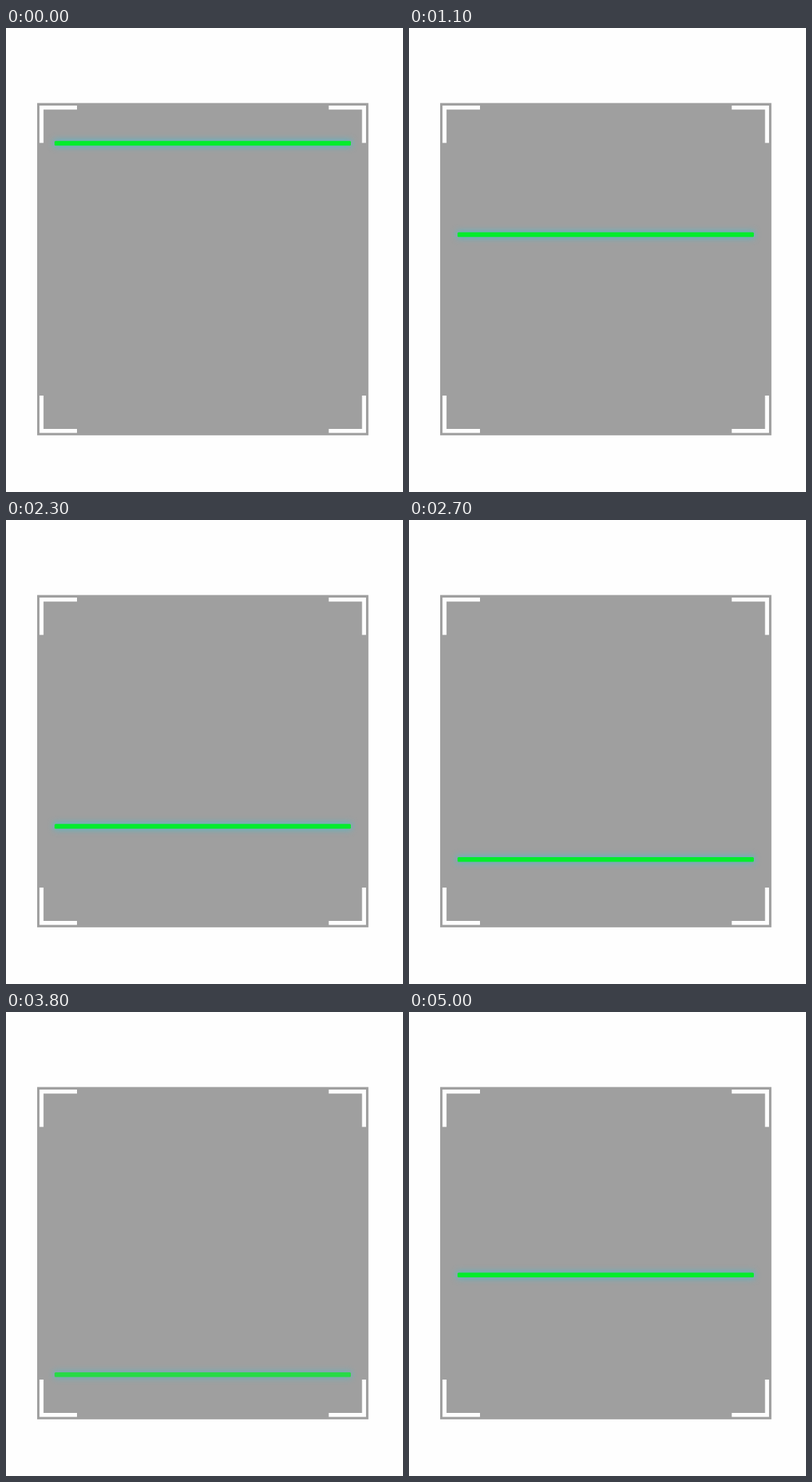
Animation of 548 by 640 pixels, one loop 5.1 s. Source, as an HTML page:

```html
<!DOCTYPE html>
<html lang="en">
<head>
<meta charset="utf-8">
<title>Scanner</title>
<style>
html, body { margin: 0; width: 100%; height: 100%; overflow: hidden; background: #fefefe; }
svg { display: block; }
.glow { fill: rgba(70, 190, 210, .7); filter: blur(4px); }
</style>
</head>
<body>
<svg width="548" height="640">
  <rect x="43" y="103.5" width="457.3" height="458.3" fill="#9f9f9f"/>
  <path fill="none" stroke="#fefefe" stroke-width="5.5"
    d="M49 158.5V109.8H98 M445.5 109.8H494.2V158.5 M49 507V555.8H98 M445.5 555.8H494.2V507"/>
  <g id="beam">
    <rect class="glow" x="66" y="-5" width="411" height="10"/>
    <rect x="67" y="-3.25" width="409" height="6.5" rx="1.5" fill="#04ec2c"/>
  </g>
</svg>
<script>
const LOOP = 5100, STEP = 100;
const TURN = 3390, LOWEST = 547.2, SPEED = 0.1145;
const FADE_START = 178, FADE_TIME = 300;
const beam = document.getElementById('beam');

// The beam sweeps down and back at constant speed, vanishing around the turn.
function draw() {
  const t = Math.floor(performance.now() % LOOP / STEP) * STEP;
  const away = Math.abs(t - TURN);
  const fade = (away - FADE_START) / FADE_TIME;
  beam.setAttribute('transform', `translate(0 ${LOWEST - SPEED * away})`);
  beam.setAttribute('opacity', Math.min(1, Math.max(0, fade)));
  requestAnimationFrame(draw);
}
draw();
</script>
</body>
</html>
```
